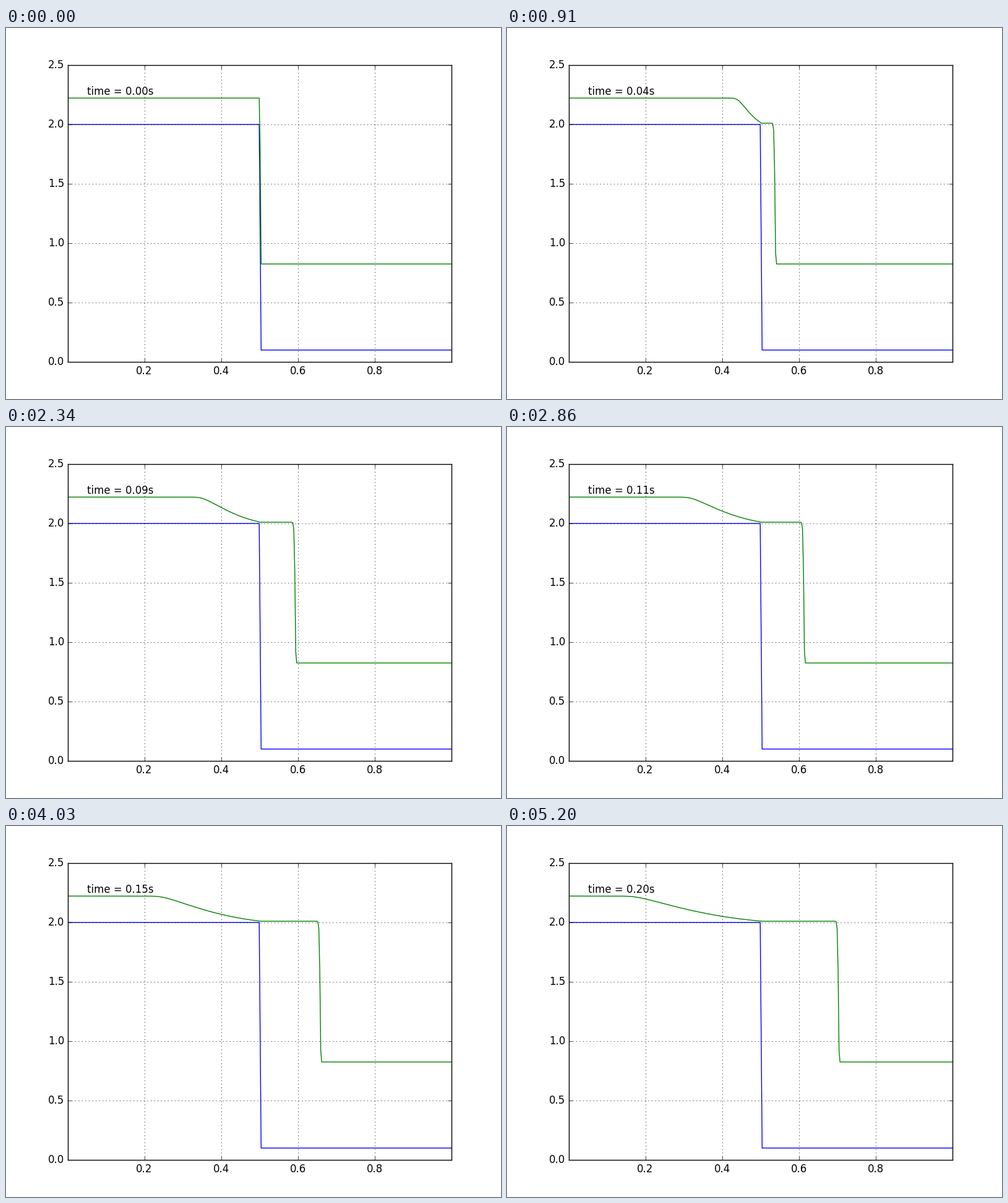
A matplotlib script for the animation above (5.33 s loop, 800 by 600 pixels).

```python
import matplotlib.pyplot as plt
import numpy as np
from matplotlib.animation import FuncAnimation

plt.style.use("classic")
plt.rcParams.update({
    "font.family": "DejaVu Sans",
    "figure.facecolor": "white",
    "figure.dpi": 100,
    "savefig.dpi": 100,
})

CELLS, FRAMES, SUBSTEPS = 400, 41, 6
DT = 0.005
G = 2.0
H_LEFT, H_CRIT = 0.2222, 0.0104
BED_LEFT, BED_RIGHT = 2.0, 0.1
SURF_RIGHT = 0.825
PLATEAU = BED_LEFT + H_CRIT
FRONT = [2.005, 1.95, 1.60, 0.92]  # numerical shock, one value per cell

dx = 1 / CELLS
mid = CELLS // 2
x = (np.arange(CELLS) + 0.5) * dx

bed = np.where(x < 0.5, BED_LEFT, BED_RIGHT)
bed[mid] = (BED_LEFT + BED_RIGHT) / 2


def flux(h):
    """Discharge in the left-going simple wave, critical at the step."""
    return h * (3 * np.sqrt(G * H_CRIT) - 2 * np.sqrt(G * h))


def solve_depths():
    """First-order upwind rarefaction upstream of the step."""
    h = np.full(mid + 1, H_LEFT)
    h[-1] = H_CRIT
    depths = [h[:-1].copy()]
    for _ in range(FRAMES - 1):
        for _ in range(SUBSTEPS):
            h[:-1] -= DT / SUBSTEPS / dx * np.diff(flux(h))
        depths.append(h[:-1].copy())
    return depths


depths = solve_depths()


def surface(n):
    eta = np.full(CELLS, SURF_RIGHT)
    eta[:mid] = BED_LEFT + depths[n]
    if n == 0:
        eta[mid] = bed[mid] + SURF_RIGHT - BED_RIGHT
    else:
        shock = mid + 2 * n  # unit speed: two cells per frame
        eta[mid:shock - 2] = PLATEAU
        eta[shock - 2:shock + 2] = FRONT
    return eta


fig = plt.figure(figsize=(8, 6), dpi=100)
ax = fig.add_axes([0.125, 0.1, 0.775, 0.8])
ax.plot(x, bed, "b")
water, = ax.plot(x, surface(0), "g")
ax.set_xlim(x[0], x[-1])
ax.set_ylim(0, 2.5)
ax.grid(True)
clock = ax.text(0.05, 0.9, "", transform=ax.transAxes)


def update(n):
    water.set_ydata(surface(n))
    clock.set_text(f"time = {n / 200:.2f}s")
    return water, clock


anim = FuncAnimation(fig, update, frames=FRAMES, interval=130,
                     repeat=True, repeat_delay=0, blit=False)
plt.show()
```
